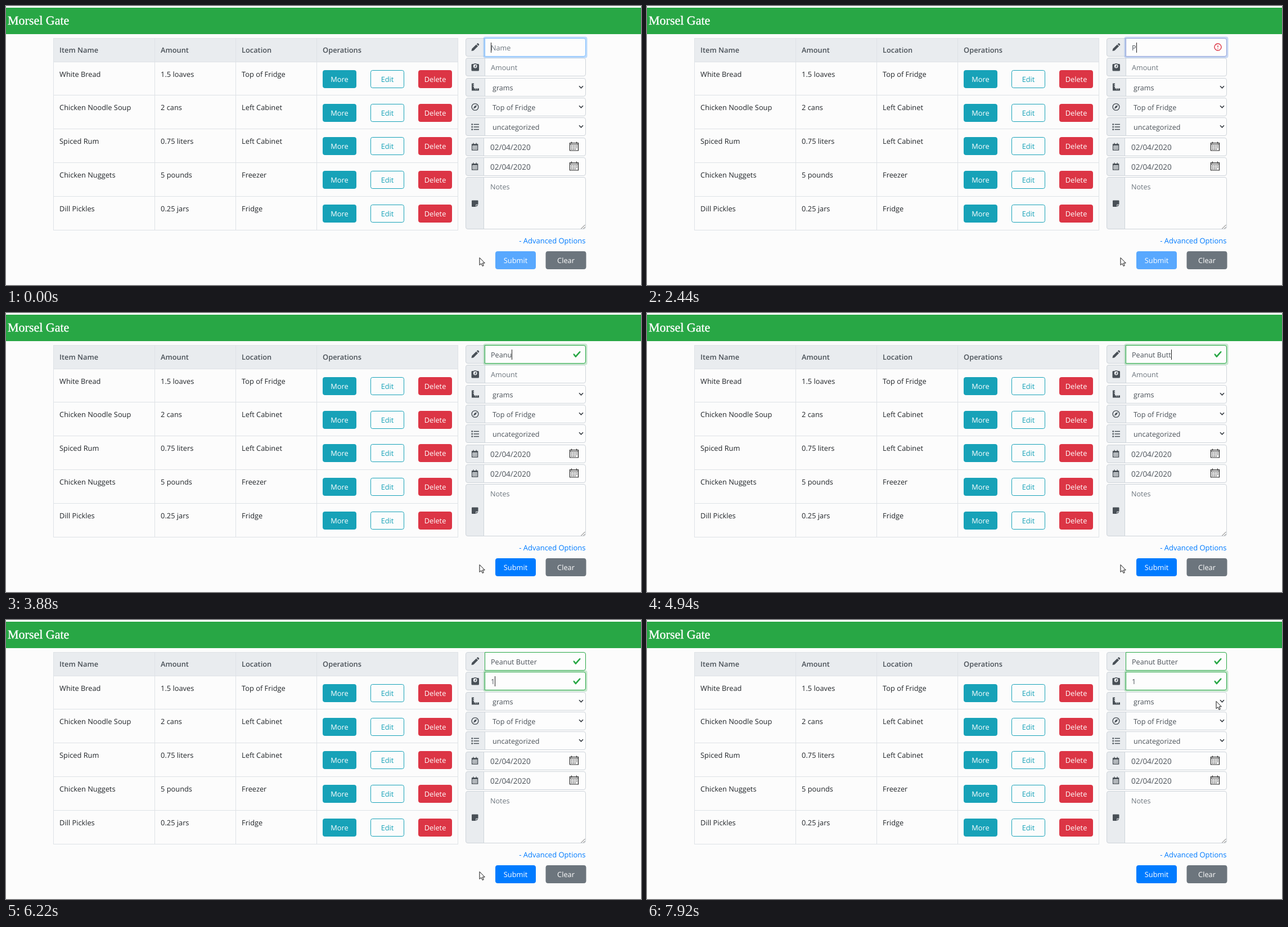
An HTML page for the animation above (8000 ms loop, 1129x496 px).

```html
<!DOCTYPE html>
<html lang="en">
<head>
<meta charset="utf-8">
<title>Pantry list</title>
<style>
  html, body { margin: 0; width: 100%; height: 100%; overflow: hidden; background: #fcfcfc; }
  svg { display: block; width: 1129px; height: 496px; }
  text { font: 12.8px "Open Sans", "Noto Sans", sans-serif; fill: #212529; text-rendering: geometricPrecision; white-space: pre; }
  .brand { font: 22px "Liberation Serif", serif; fill: #fff; stroke: #fff; stroke-width: .4; }
  .head { font-weight: 600; fill: #495057; }
  .mid { text-anchor: middle; }
  .end { text-anchor: end; }
  .white { fill: #fff; }
  .info { fill: #17a2b8; }
  .link { font-size: 13px; fill: #007bff; }
  .value { font-size: 12.6px; fill: #495057; }
  .hint { font-size: 12.6px; fill: #6c757d; }
  .date { font-size: 13.5px; }
</style>
</head>
<body>
<svg id="stage" viewBox="0 0 1129 496"></svg>
<script>
const LOOP = 8000;
const stage = document.getElementById('stage');

function add(tag, attrs, content) {
  const el = document.createElementNS('http://www.w3.org/2000/svg', tag);
  for (const k in attrs) el.setAttribute(k, attrs[k]);
  if (content !== undefined) el.textContent = content;
  stage.append(el);
  return el;
}
const rect = (x, y, width, height, fill, more) => add('rect', { x, y, width, height, fill, ...more });
const text = (x, y, s, cls = '') => add('text', { x, y, class: cls }, s);
const path = (d, more) => add('path', { d, fill: 'none', ...more });

function button(x, y, w, label, fill, outline) {
  const box = rect(x + .5, y + .5, w - 1, 31, outline ? '#fcfcfc' : fill, { rx: 3.2, stroke: fill });
  text(x + w / 2, y + 20.8, label, outline ? 'mid info' : 'mid white');
  return box;
}

// Header bar
rect(0, 0, 1129, 496, '#fcfcfc');
rect(0, 0, 1129, 3, '#fff');
rect(0, 3, 1129, 47, '#28a745');
text(3, 33, 'Morsel Gate', 'brand');

// Item table
const cols = [84.5, 264.5, 408.5, 552.5, 803.5];
const items = [
  ['White Bread', '1.5 loaves', 'Top of Fridge'],
  ['Chicken Noodle Soup', '2 cans', 'Left Cabinet'],
  ['Spiced Rum', '0.75 liters', 'Left Cabinet'],
  ['Chicken Nuggets', '5 pounds', 'Freezer'],
  ['Dill Pickles', '0.25 jars', 'Fridge']
];
const pitch = 59.8;
rect(84, 57, 720, 42, '#e9ecef');
let grid = 'M84 57.5H804';
for (let i = 0; i <= items.length; i++) grid += `M84 ${Math.floor(99 + i * pitch) + .5}H804`;
for (const x of cols) grid += `M${x} 57V399`;
path(grid, { stroke: '#dee2e6' });
['Item Name', 'Amount', 'Location', 'Operations'].forEach((s, i) => text(cols[i] + 10.6, 83.3, s, 'head'));
items.forEach((row, i) => {
  const y = i * pitch;
  row.forEach((s, c) => text(cols[c] + 10.6, 125.6 + y, s));
  const top = Math.round(113.8 + y);
  button(563, top, 60, 'More', '#17a2b8');
  button(648, top, 60, 'Edit', '#17a2b8', true);
  button(733, top, 60, 'Delete', '#dc3545');
});

// Form
const ink = '#495057';
const rowTop = i => Math.round(57 + i * 35.35) + .5;
const rowLeft = i => i < 5 ? 851.5 : 849.5;
const rowHeight = i => i < 7 ? 32 : 92;
for (let i = 0; i < 8; i++) rect(817.5, rowTop(i), 40, rowHeight(i), '#e9ecef', { rx: 3.5, stroke: '#ced4da' });

function field(i) {
  const x = rowLeft(i), y = rowTop(i), h = rowHeight(i);
  return path(`M${x} ${y}H1027q3.5 0 3.5 3.5v${h - 7}q0 3.5 -3.5 3.5H${x}Z`, { fill: '#fdfdfd', stroke: '#ced4da' });
}
const ring = i => rect(848.5, rowTop(i) - 3, 185, 38, 'none', { rx: 4 });
for (let i = 2; i < 8; i++) field(i);
const amountRing = ring(1), amountBox = field(1);
const nameRing = ring(0), nameBox = field(0);

['grams', 'Top of Fridge', 'uncategorized'].forEach((s, i) => {
  const y = rowTop(i + 2);
  text(865, y + 21.5, s, 'value');
  path(`M1019 ${y + 13.8}l3.5 3.5l3.5 -3.5`, { stroke: '#343a40', 'stroke-width': 1.6 });
});
for (const i of [5, 6]) {
  const y = rowTop(i);
  text(861, y + 21.3, '02/04/2020', 'value date');
  path(`M1002.5 ${y + 9}h15v13.5h-15zM1002 ${y + 11.5}h16M1005.5 ${y + 7}v3M1014.5 ${y + 7}v3`, { stroke: '#222', 'stroke-width': 1.2 });
  path(`M1005 ${y + 14.5}h11M1005 ${y + 17.3}h11M1005 ${y + 20}h8`, { stroke: '#222', 'stroke-width': 1.3, 'stroke-dasharray': '1.4 1.6' });
}
text(861, 326, 'Notes', 'hint');
path('M1022.5 396l7 -7M1026.5 396l3 -3', { stroke: '#666' });

// Row icons
path('M827.5 80l.8 -3.9l7.7 -7.7l3.1 3.1l-7.7 7.7zM836.8 67.6l1.3 -1.2q.8 -.6 1.6 .1l1.3 1.4q.7 .8 0 1.5l-1.2 1.3z', { fill: ink });
rect(827.5, 103, 13.5, 12.5, ink, { rx: 1.5 });
add('circle', { cx: 834.2, cy: 106.5, r: 4.6, fill: ink });
add('circle', { cx: 834.2, cy: 107, r: 3.4, fill: '#e9ecef' });
path('M834 109l1.4 -3.6', { stroke: ink, 'stroke-width': 1.6 });
path('M828 137.5h4v9h9v4h-13z', { fill: ink });
path('M830 140h2M830 143h2M834.5 146.5v2M837.5 146.5v2', { stroke: '#e9ecef' });
add('circle', { cx: 834, cy: 179.5, r: 5.9, fill: 'none', stroke: ink, 'stroke-width': 1.4 });
path('M830.8 182.7l2 -4.6l4.5 -1.9l-2 4.5z', { fill: ink });
path('M831.5 210.5h9.5M831.5 215h9.5M831.5 219.5h9.5', { stroke: ink, 'stroke-width': 1.7 });
path('M827.5 210.5h2.4M827.5 215h2.4M827.5 219.5h2.4', { stroke: ink, 'stroke-width': 2.3 });
for (const i of [5, 6]) {
  const y = rowTop(i);
  path(`M828.6 ${y + 11.5}h10v10h-10zM828 ${y + 13}h11M831 ${y + 9}v3M836.2 ${y + 9}v3`, { stroke: ink, 'stroke-width': 1.4 });
  path(`M830.5 ${y + 16}h7M830.5 ${y + 18.8}h7`, { stroke: ink, 'stroke-width': 1.5, 'stroke-dasharray': '1.6 1' });
}
path('M829 345.5h9.5q1 0 1 1v6.3h-4.2v4.2h-6.3q-1 0 -1 -1v-9.5q0 -1 1 -1zM836.2 353.7h3.2l-3.2 3.2z', { fill: ink });

text(1030.5, 421.8, '- Advanced Options', 'end link');
const submit = button(870, 436, 72, 'Submit', '#58a8fe');
button(959.5, 436, 72, 'Clear', '#6c757d');

// Moving parts
const nameText = text(862, 79, 'Name', 'hint');
const amountText = text(862, 114.4, 'Amount', 'hint');
const check = y => path('M2.3 6.73L.6 4.53c-.4-1.04.46-1.4 1.1-.8l1.1 1.4 3.4-3.8c.6-.63 1.6-.27 1.2.7l-4 4.6c-.43.5-.8.4-1.1.1z',
  { fill: '#28a745', transform: `translate(1007.7 ${y}) scale(1.85)` });
const nameCheck = check(66), amountCheck = check(101.5);
const warn = path('M1015 67a6 6 0 1 0 .01 0zM1015 70v3.6M1015 75.2v1.4', { stroke: '#dc3545', 'stroke-width': 1.4 });
const caret = rect(862, 65, 1, 18, '#222');
const pointer = path('M.5 .5V13.6L3.5 10.8L5.6 15.4L7.7 14.5L5.7 10H9.8Z', { fill: '#fff', stroke: '#111' });

const GRAY = [206, 212, 218], BLUE = [128, 189, 255], RED = [220, 53, 69], GREEN = [40, 167, 69];
const glow = (c, a = .25) => [...(c === BLUE ? [0, 123, 255] : c), a];

const nameEdge = [[2410, BLUE], [2560, RED], [2640, RED], [2790, GREEN]];
const nameGlow = [...nameEdge.map(([t, c]) => [t, glow(c)]), [5650, glow(GREEN)], [5730, glow(GREEN, 0)]];
const amountEdge = [[5670, GRAY], [5790, BLUE], [6100, BLUE], [6220, GREEN]];
const amountGlow = [[5715, glow(BLUE, 0)], [5790, glow(BLUE)], [6100, glow(BLUE)], [6220, glow(GREEN)]];
const phrase = 'Peanut Butter';
const keys = [2410, 2640, 2800, 3490, 3880, 3940, 4120, 4390, 4710, 4850, 4940, 5100, 5160];
const caretOn = [[0, 150], [640, 1180], [1710, 2230], [2410, 3340], [3490, 6620], [7190, 7720]];

// The pointer swings out to the right and hooks back onto the select's arrow.
const move = { from: 7210, to: 7920, x: [842, 940, 1085, 1012], y: [447, 370, 200, 144] };
const bezier = ([a, b, c, d], u) => {
  const v = 1 - u;
  return a * v ** 3 + 3 * b * v * v * u + 3 * c * v * u * u + d * u ** 3;
};

function track(steps, t) {
  if (t <= steps[0][0]) return steps[0][1];
  for (let i = 1; i < steps.length; i++) {
    const [t0, a] = steps[i - 1], [t1, b] = steps[i];
    if (t < t1) return a.map((v, k) => v + (b[k] - v) * (t - t0) / (t1 - t0));
  }
  return steps[steps.length - 1][1];
}
const css = c => `rgba(${c.slice(0, 3).map(Math.round)},${c[3] ?? 1})`;
const show = (el, on) => el.setAttribute('visibility', on ? 'visible' : 'hidden');

function fillField(el, typed, hint) {
  const s = typed || hint;
  if (el.textContent === s) return;
  el.textContent = s;
  el.setAttribute('class', typed ? 'value' : 'hint');
}

function draw(t) {
  const typed = phrase.slice(0, keys.filter(k => k <= t).length);
  const amount = t >= 6100 ? '1' : '';
  const valid = typed.length > 1;
  fillField(nameText, typed, 'Name');
  fillField(amountText, amount, 'Amount');
  nameBox.setAttribute('stroke', css(track(nameEdge, t)));
  nameRing.setAttribute('fill', css(track(nameGlow, t)));
  amountBox.setAttribute('stroke', css(track(amountEdge, t)));
  amountRing.setAttribute('fill', css(track(amountGlow, t)));
  show(warn, typed.length === 1);
  show(nameCheck, valid);
  show(amountCheck, amount);
  for (const k of ['fill', 'stroke']) submit.setAttribute(k, valid ? '#007bff' : '#58a8fe');

  const inAmount = t >= 5670;
  const width = (inAmount ? amount : typed) ? (inAmount ? amountText : nameText).getComputedTextLength() : 0;
  caret.setAttribute('x', Math.round(862 + width));
  caret.setAttribute('y', inAmount ? 100 : 65);
  show(caret, caretOn.some(([a, b]) => t >= a && t < b));

  const p = Math.min(1, Math.max(0, (t - move.from) / (move.to - move.from)));
  const u = p * p * (3 - 2 * p);
  const [x, y] = [move.x, move.y].map(points => Math.round(bezier(points, u)));
  pointer.setAttribute('transform', `translate(${x - .5} ${y})`);
}

function tick() {
  draw(performance.now() % LOOP);
  requestAnimationFrame(tick);
}
tick();
</script>
</body>
</html>
```
